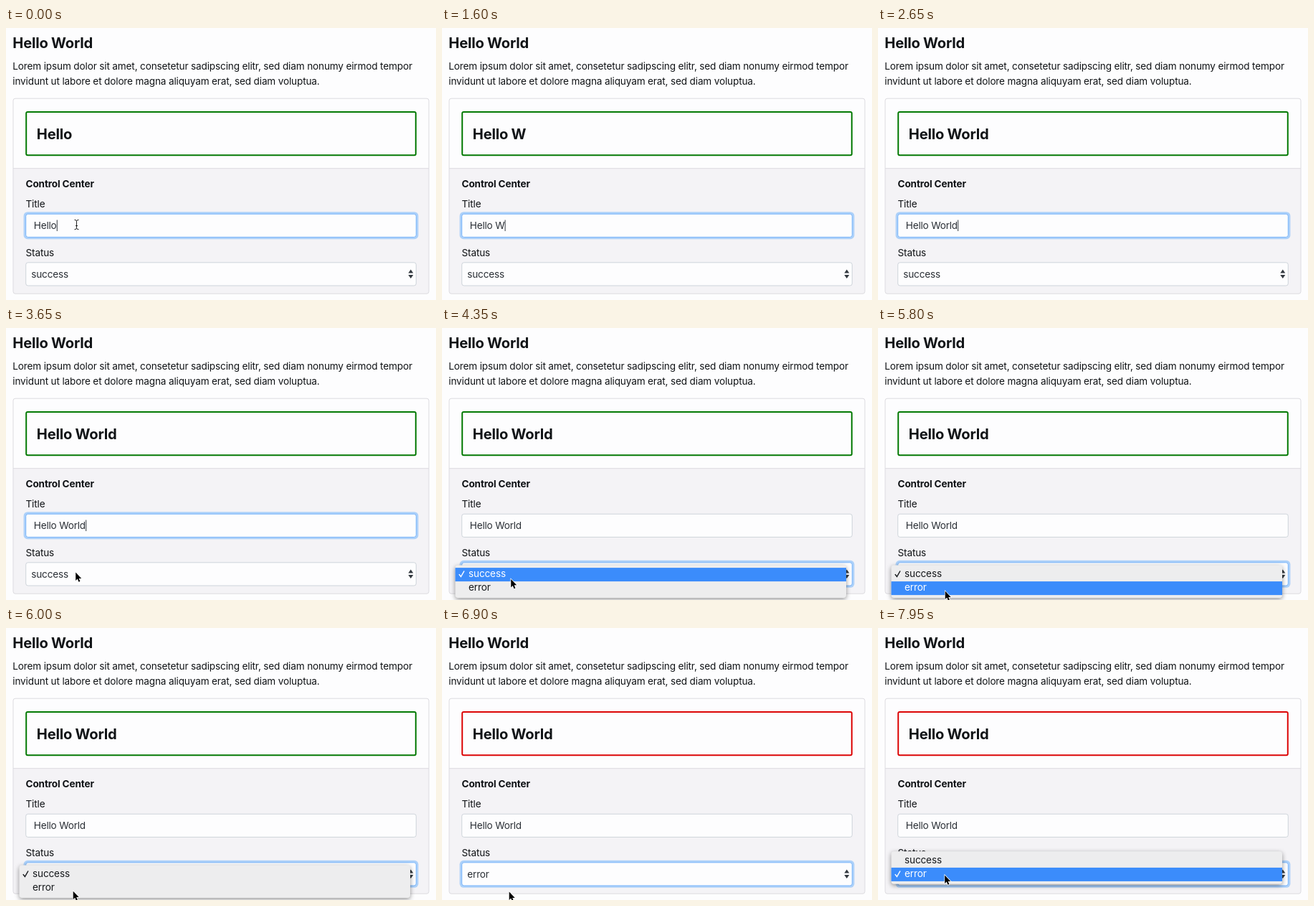
Recreate the animation shown at these times as an HTML page. Size 600 px wide and 379 px high, loop 8000 ms.

```html
<!DOCTYPE html>
<html lang="en">
<head>
<meta charset="utf-8">
<title>Control Center</title>
<style>
  html, body { margin: 0; width: 100%; height: 100%; overflow: hidden; background: #fdfdfe; }
  svg { display: block; width: 600px; height: 379px; }
  text { font: 13.6px Inter, "Open Sans", sans-serif; letter-spacing: -.158px; fill: #101316; white-space: pre; }
  .big { font-size: 20.2px; font-weight: 700; letter-spacing: -.24px; }
  .bold { font-weight: 700; letter-spacing: -.15px; }
  .field { fill: #fdfdfe; }
  .value { fill: #2a2f35; letter-spacing: -.2px; }
  .ring { fill: #007bff; fill-opacity: .29; }
  #popup { filter: drop-shadow(0 2px 3px rgba(0, 0, 0, .42)); }
</style>
</head>
<body>
<svg viewBox="0 0 600 379">
  <text class="big" x="9.3" y="27.5">Hello World</text>
  <text x="9.3" y="58">Lorem ipsum dolor sit amet, consetetur sadipscing elitr, sed diam nonumy eirmod tempor</text>
  <text x="9.3" y="79">invidunt ut labore et dolore magna aliquyam erat, sed diam voluptua.</text>

  <rect x="10" y="98.2" width="580" height="272" rx="3" fill="#fdfdfe"/>
  <path d="M10 195.7H590V367.2a3 3 0 0 1-3 3H13a3 3 0 0 1-3-3z" fill="#f4f3f6"/>
  <path d="M10 195.7H590" stroke="#dcdbe0"/>
  <rect x="10" y="98.2" width="580" height="272" rx="3" fill="none" stroke="#dcdbe0"/>
  <rect id="alert" x="28.2" y="117" width="543.6" height="60.3" rx="2" fill="none" stroke-width="2"/>
  <text id="headline" class="big" x="42.8" y="154.7"></text>

  <text class="bold" x="27.5" y="222">Control Center</text>
  <text x="27.5" y="250">Title</text>
  <rect class="ring" id="titleRing" x="24.6" y="256.2" width="550.8" height="38" rx="5.5"/>
  <rect class="field" id="titleBox" x="27.7" y="259.2" width="544.6" height="32.2" rx="3"/>
  <text id="title" class="value" x="38.8" y="280"></text>
  <rect id="caret" y="267.5" width="1" height="15.5" fill="#343a40"/>

  <text x="27.5" y="318">Status</text>
  <rect class="ring" id="statusRing" x="24.6" y="323.8" width="550.8" height="38" rx="5.5"/>
  <rect class="field" id="statusBox" x="27.7" y="326.8" width="544.6" height="32.2" rx="3"/>
  <text id="status" class="value" x="35.3" y="347.8"></text>
  <path d="M561.3 341.4l3.5-5 3.5 5zM561.3 344l3.5 5 3.5-5z" fill="#343a40"/>

  <g id="popup">
    <rect x="18.5" width="545.5" height="45.5" rx="4" fill="#ededee"/>
    <rect id="mark" x="18.5" width="545.5" height="19" fill="#3b8cfb"/>
    <path id="check" d="M23.8 12.6l2.6 3.4 4.6-8" fill="none" stroke-width="1.5"/>
    <text id="item0" x="37" y="16.7">success</text>
    <text id="item1" x="37" y="35.9">error</text>
  </g>

  <path id="beam" d="M-3-6.8q3 0 3 2.3V4.5q0 2.3-3 2.3M3-6.8q-3 0-3 2.3M3 6.8q-3 0-3-2.3M-1.5 1.5h3" fill="none" stroke="#222"/>
  <path id="arrow" d="M.2.6V12L2.7 9.6 4.5 13.8 6.4 13 4.7 8.9H8.2z" fill="#000" stroke="#fff" stroke-width="1.4" paint-order="stroke"/>
</svg>
<script>
const LOOP = 8000, OPEN = 3850, CLICK = 5950, CLOSE = 6100, REOPEN = 7650;
const KEYS = [850, 1350, 1700, 1900, 2100, 2350];
const PATH = [ // time, x, y
  [0, 98.5, 274], [2900, 98.5, 274], [3500, 97, 340], [4150, 97, 340], [4600, 94.7, 362.5],
  [4850, 94.5, 363], [5700, 93.5, 366], [6800, 93.5, 367], [7000, 93.5, 367], [7500, 93, 344], [LOOP, 93, 344]
];
const $ = id => document.getElementById(id);
const set = (id, attrs) => { for (const k in attrs) $(id).setAttribute(k, attrs[k]); };
const show = (id, on) => set(id, { opacity: +on });
const ramp = (t, start, span) => Math.min(1, Math.max(0, (t - start) / span));

function pointer(t) {
  const i = PATH.findIndex(p => p[0] > t);
  const [t0, x0, y0] = PATH[i - 1], [t1, x1, y1] = PATH[i];
  const u = (t - t0) / (t1 - t0), e = u * u * (3 - 2 * u);
  return [x0 + (x1 - x0) * e, y0 + (y1 - y0) * e];
}

function caretOn(t) {
  if (t >= OPEN) return false;
  const last = KEYS.filter(k => k <= t).pop() ?? -200;
  return Math.floor((t - last) / 500) % 2 === 0;
}

function focus(name, amount) {
  show(name + "Ring", amount);
  set(name + "Box", { stroke: `color-mix(in srgb, #78b4fa ${amount * 100}%, #ced4da)` });
}

function drawPopup(t, y) {
  const again = t >= REOPEN;
  const blink = t >= CLICK && t < CLICK + 60;
  const active = again || y > 353 ? 1 : 0;
  const ink = i => i === active && !blink ? "#fff" : "#15181b";
  set("popup", {
    transform: `translate(0 ${again ? 311.3 : 330.5})`,
    opacity: again ? 1 : t < OPEN ? 0 : 1 - ramp(t, CLOSE, 200)
  });
  set("mark", { y: active ? 22.6 : 3.6, opacity: blink ? 0 : 1 });
  [0, 1].forEach(i => $("item" + i).style.fill = ink(i));
  set("check", { stroke: ink(+again), transform: `translate(0 ${again ? 19.2 : 0})` });
}

function draw(t) {
  const typed = KEYS.filter(k => k <= t).length;
  const value = "Hello World".slice(0, 5 + typed);
  $("headline").textContent = $("title").textContent = value;
  set("caret", { x: 39 + $("title").getComputedTextLength() });
  show("caret", caretOn(t));

  const failed = t >= CLOSE;
  set("alert", { stroke: failed ? "#dc0606" : "#047a04" });
  $("status").textContent = failed ? "error" : "success";
  const moved = ramp(t, OPEN, 150);
  focus("title", 1 - moved);
  focus("status", moved);

  const [x, y] = pointer(t);
  drawPopup(t, y);
  const visible = t < KEYS[0] || t >= 2900, inField = y < 292;
  for (const id of ["beam", "arrow"]) set(id, { transform: `translate(${x} ${y})` });
  show("beam", visible && inField);
  show("arrow", visible && !inField);
}

const start = performance.now();
function frame() {
  draw((performance.now() - start) % LOOP);
  requestAnimationFrame(frame);
}
frame();
</script>
</body>
</html>
```
